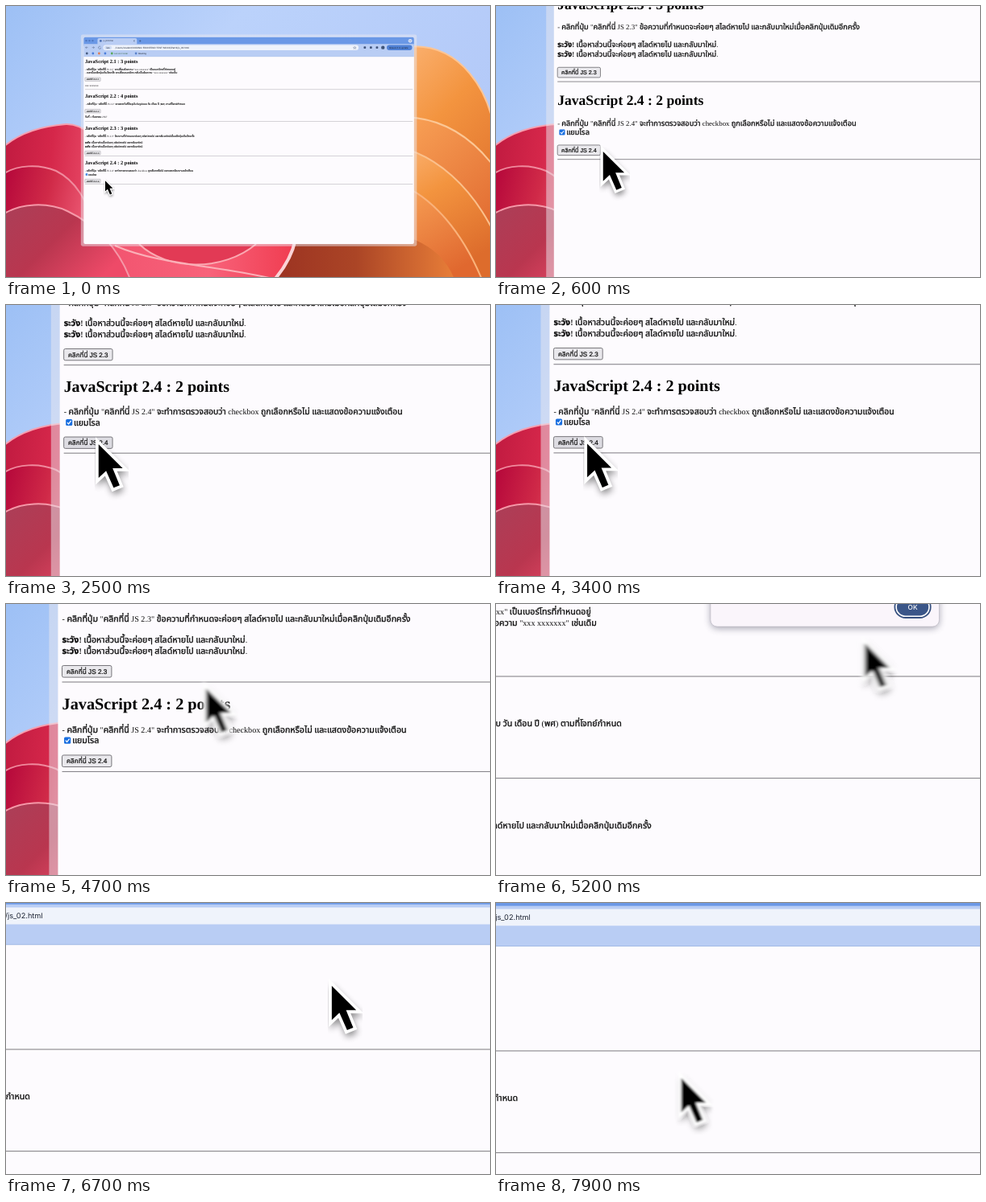
Recreate the animation shown at these times as an HTML page. Size 600 by 337 pixels, loop 8000 ms.

```html
<!DOCTYPE html>
<html lang="th">
<head>
<meta charset="utf-8">
<title>JavaScript exercises</title>
<style>
  html, body { margin: 0; width: 100%; height: 100%; overflow: hidden; background: #b3ccf8; }
  svg { display: block; width: 100vw; height: 100vh; text-rendering: geometricPrecision; }
  text { white-space: pre; }
  .serif { font: 500 16px "Liberation Serif", "Noto Sans Thai", "Noto Serif Thai", "Noto Sans", serif; fill: #0c0c0c; }
  .head { font: 700 32px "Liberation Serif", serif; fill: #000; }
  .btn { font: 500 13px "Liberation Sans", "Noto Sans Thai", "Noto Sans", sans-serif; text-anchor: middle; fill: #0c0c0c; stroke: #0c0c0c; stroke-width: .35px; }
  .ui { font: 400 14.5px Inter, "Noto Sans Thai", sans-serif; fill: #1d2433; }
  .thai { font-size: 1.055em; stroke: #0c0c0c; stroke-width: .5px; }
  .end { text-anchor: end; }
  .mid { text-anchor: middle; }
</style>
</head>
<body>
<svg viewBox="0 0 600 337" preserveAspectRatio="none">
  <defs>
    <linearGradient id="sky" x1="0" y1="0" x2="1" y2=".5">
      <stop offset="0" stop-color="#9dc0f5"/><stop offset=".4" stop-color="#bbd2fb"/><stop offset="1" stop-color="#b3c9f8"/>
    </linearGradient>
    <linearGradient id="rose" x1="0" y1="0" x2="1" y2=".15">
      <stop offset="0" stop-color="#c01a40"/><stop offset=".4" stop-color="#d5274a"/><stop offset="1" stop-color="#f4627a"/>
    </linearGradient>
    <linearGradient id="ruby" x1="0" y1="0" x2="1" y2=".3">
      <stop offset="0" stop-color="#b4063a"/><stop offset=".5" stop-color="#d02a48"/><stop offset="1" stop-color="#f0607a"/>
    </linearGradient>
    <linearGradient id="wine" x1="0" y1="0" x2="1" y2=".6">
      <stop offset="0" stop-color="#ab3f58"/><stop offset=".5" stop-color="#b9364f"/><stop offset="1" stop-color="#ee4a68"/>
    </linearGradient>
    <linearGradient id="pink" x1="0" y1="0" x2="1" y2="0">
      <stop offset="0" stop-color="#f0506c"/><stop offset=".6" stop-color="#f8627a"/><stop offset="1" stop-color="#f03c50"/>
    </linearGradient>
    <linearGradient id="amber" x1="0" y1="0" x2=".4" y2="1">
      <stop offset="0" stop-color="#fbb272"/><stop offset=".4" stop-color="#f3943f"/><stop offset="1" stop-color="#dd6c2c"/>
    </linearGradient>
    <linearGradient id="coral" x1="0" y1="0" x2=".5" y2="1">
      <stop offset="0" stop-color="#f9a357"/><stop offset="1" stop-color="#e0682f"/>
    </linearGradient>
    <linearGradient id="rust" x1="0" y1="0" x2="1" y2="0">
      <stop offset="0" stop-color="#9c3322"/><stop offset=".45" stop-color="#ab4526"/><stop offset="1" stop-color="#e87e38"/>
    </linearGradient>
    <filter id="soft" x="-20%" y="-20%" width="140%" height="140%"><feGaussianBlur stdDeviation="7"/></filter>
    <filter id="motion" x="-40%" y="-40%" width="180%" height="180%"><feGaussianBlur id="smear" stdDeviation="0"/></filter>
  </defs>

  <g stroke-width="2">
    <rect width="600" height="337" fill="url(#sky)"/>
    <path d="M495 51C530 47 555 60 575 84C589 101 597 118 602 138V340H490Z" fill="url(#amber)" stroke="#fcc595"/>
    <path d="M490 138C535 138 572 158 602 196V340H490Z" fill="url(#coral)" stroke="#fcc795"/>
    <path d="M490 176C535 188 575 224 602 276V340H490Z" fill="url(#amber)" stroke="#fbc08c"/>
    <path d="M490 222C530 240 565 280 590 340H490Z" fill="url(#coral)" stroke="#fab27a"/>
    <path d="M334 340C345 326 352 312 357 290H505C530 300 548 318 556 340Z" fill="url(#rust)"/>
    <path d="M-2 174C20 156 48 149 74 147C90 146 120 160 150 210V340H-2Z" fill="url(#rose)" stroke="#f5a0b0"/>
    <path d="M-2 208C14 198 40 196 62 205C86 217 100 240 112 280V340H-2Z" fill="url(#ruby)" stroke="#f08a9d"/>
    <path d="M90 282H359C355 308 345 326 333 340H90Z" fill="url(#pink)"/>
    <path d="M359 290C355 308 345 326 333 340" fill="none" stroke="#fbd3d6" stroke-width="4"/>
    <path d="M165 296C200 330 270 330 310 296" fill="#e23a55" stroke="#fba9b2"/>
    <path d="M135 298C190 322 260 322 335 340" fill="none" stroke="#fbb0b8"/>
    <path d="M-2 258C18 246 50 243 76 255C112 272 140 302 154 340H-2Z" fill="url(#wine)" stroke="#f598a8"/>
  </g>

  <g id="world">
    <rect x="-17.5" y="-138" width="2095" height="1324" rx="12" fill="#eceaf0" fill-opacity=".5"/>
    <g id="page"></g>
    <g id="dialog"></g>
    <g id="cursor">
      <path d="M7 13V80L22 66L37 100L49 95L35 61H55Z" transform="translate(2 8)" stroke="#000" stroke-width="9" opacity=".45" filter="url(#soft)"/>
      <path d="M7 13V80L22 66L37 100L49 95L35 61H55Z" stroke="#fff" stroke-width="12" paint-order="stroke"/>
    </g>
  </g>
</svg>
<script>
const LOOP = 8000, WIDTH = 2060;
const $ = id => document.getElementById(id);

function add(parent, tag, attrs, content) {
  const el = document.createElementNS("http://www.w3.org/2000/svg", tag);
  for (const key in attrs) el.setAttribute(key, attrs[key]);
  if (content) el.innerHTML = content;
  parent.appendChild(el);
  return el;
}
const page = $("page"), dialog = $("dialog");
const box = (g, x, y, width, height, fill, more) => add(g, "rect", { x, y, width, height, fill, ...more });
const dot = (x, y, r, fill) => add(page, "circle", { cx: x, cy: y, r, fill });
const label = (g, x, y, cls, content, style = "") => add(g, "text", { x, y, class: cls, style }, content);
const line = (d, stroke, width) => add(page, "path", { d, stroke, "stroke-width": width, fill: "none" });

function browserBar() {
  box(page, 0, -122, WIDTH, 1294, "#fdfbfe", { rx: 10 });
  box(page, 0, -122, WIDTH, 60, "#6a98e6", { rx: 10 });
  box(page, 0, -79, WIDTH, 79, "#b9cdf4");
  line(`M0 0H${WIDTH}`, "#9db6e4", 1.5);
  for (const x of [16, 36, 56]) dot(x, -100, 6, "#4f77bf");
  box(page, 86, -116, 246, 44, "#b9cdf4", { rx: 10 });
  dot(106, -98, 7, "#4a6fb5");
  label(page, 122, -93, "ui", "js_02.html", "font-size:13px");
  line("M310 -103l9 9m0 -9l-9 9M346 -98h12m-6 -6v12", "#24344f", 2);
  dot(2036, -99, 12, "#d5e1f8");
  line("M2031 -102l5 5l5 -5", "#24344f", 2);
  line("M26 -57H12l6 -6m-6 6l6 6M52 -57h14l-6 -6m6 6l-6 6M106 -62a8 8 0 1 0 2 6", "#33466a", 2);
  box(page, 122, -73, 1592, 33, "#eff3fb", { rx: 16 });
  box(page, 128, -68, 48, 23, "#d3dff5", { rx: 11 });
  label(page, 152, -51.5, "ui mid", "ไฟล์", "font-size:13px");
  label(page, 657, -51, "ui end", "/Users/student/CODING-FRONTEND-TEST-MOCK/Part2/js_02.html");
  line("M1690 -64l3 6h6l-5 4l2 6l-6 -4l-6 4l2 -6l-5 -4h6Z", "#33466a", 1.5);
  for (const x of [1746, 1784, 1822]) box(page, x, -64, 14, 14, "#41557c", { rx: 4 });
  dot(1866, -57, 11, "#3f5478");
  box(page, 1890, -73, 158, 33, "#4f80d4", { rx: 16 });
  label(page, 1964, -52, "ui mid", "Relaunch to update", "font-size:13px");

  ["#46597d", "#4b7edb", "#e27a4f", "#4b7edb"].forEach((c, i) => dot(20 + i * 38, -20, 7, c));
  dot(176, -20, 7, "#59a85b");
  label(page, 190, -15, "ui", "Lesson Folder", "font-size:13px;fill:#3d6b4c");
  dot(326, -20, 7, "#5b83cc");
  label(page, 340, -15, "ui", "Reading", "font-size:13px");
}

// Thai runs are a little larger and heavier than the Latin beside them
const thai = text => text.replace(/[\u0e00-\u0e7f]+/g, '<tspan class="thai">$&</tspan>');
const rule = y => box(page, 8, y - 1, WIDTH - 16, 1.7, "#858388");
const heading = (y, n, points) => label(page, 8, y, "head", `JavaScript 2.${n} : ${points} points`);
const body = (y, text, x = 8) => label(page, x, y, "serif", thai(text));
const bodyEnd = (x, y, text) => label(page, x, y, "serif end", thai(text));
const press = n => `- คลิกที่ปุ่ม "คลิกที่นี่ JS 2.${n}" `;

function button(y, n) {
  const face = box(page, 8, y - 11.5, 97, 23, "#e9e8ec", { rx: 3, stroke: "#6f6e73", "stroke-width": 1.5 });
  label(page, 56.5, y + 4.7, "btn", `คลิกที่นี่ JS 2.${n}`);
  return face;
}

browserBar();

heading(38, 1, 3);
body(84, press(1) + 'จะเปลี่ยนข้อความ "xxx xxxxxxx" เป็นเบอร์โทรที่กำหนดอยู่');
bodyEnd(583, 106, '- และเมื่อคลิกปุ่มเดิมอีกครั้ง จะเปลี่ยนเบอร์โทร กลับเป็นข้อความ "xxx xxxxxxx" เช่นเดิม');
button(142, 1);
body(185, "xxx xxxxxxx");
rule(206);

heading(259, 2, 4);
bodyEnd(632, 304, press(2) + "จะแสดงวันที่ปัจจุบัน ในรูปแบบ วัน เดือน ปี (พศ) ตามที่โจทย์กำหนด");
button(341, 2);
body(381, "วันที่ 4 กันยายน 2567");
rule(406);

heading(459, 3, 3);
body(504, press(3) + "ข้อความที่กำหนดจะค่อยๆ สไลด์หายไป และกลับมาใหม่เมื่อคลิกปุ่มเดิมอีกครั้ง");
for (const y of [545, 567])
  label(page, 8, y, "serif", `<tspan font-weight="700">${thai("ระวัง!")}</tspan>`
    + thai(" เนื้อหาส่วนนี้จะค่อยๆ สไลด์หายไป และกลับมาใหม่."));
button(602, 3);
rule(623);

heading(676, 4, 2);
body(722, press(4) + "จะทำการตรวจสอบว่า checkbox ถูกเลือกหรือไม่ และแสดงข้อความแจ้งเตือน");
box(page, 12, 731, 13, 13, "#1a6fe0", { rx: 2.5 });
line("M14.8 737.6l2.8 3l4.8 -6.4", "#fff", 2);
body(743.5, "แยมโรล", 28);
const lastButton = button(778, 4);
rule(799);

// alert box
box(dialog, 806, -32, 448, 144, "#40405a", { rx: 14, opacity: .45, filter: "url(#soft)" });
box(dialog, 806, -36, 448, 144, "#faf5fb", { rx: 13, stroke: "#b9b6c0", "stroke-width": 1 });
label(dialog, 826, 2, "ui", "This page says", "font-size:16px;font-weight:500;fill:#222");
label(dialog, 826, 31, "ui", "คุณเลือก แยมโรล", "font-size:13px;font-weight:500;fill:#222");
box(dialog, 1167, 48.5, 70, 42, "#fff", { rx: 21, stroke: "#36507f", "stroke-width": 2.8 });
box(dialog, 1171, 52.5, 62, 34, "#3b5688", { rx: 17 });
label(dialog, 1202, 74.5, "ui mid", "OK", "font-size:13px;font-weight:500;fill:#fff");

// rows of [time, value, ...]; smooth and free of overshoot
const zoom = [[0, .1988], [100, .215], [300, .39], [600, .549], [1000, .592], [1400, .6115],
  [2200, .621], [3400, .626], [4700, .633], [8200, .633]];
const pan = [[4400, 0, 0], [4700, -1.5, 25], [5000, -170, 170], [5300, -360, 320],
  [5600, -425, 366], [5800, -433, 372], [7900, -439, 376], [8200, -440, 377]];
const pointer = [[0, 127, 763], [600, 104, 768], [1400, 79, 769], [3400, 67.5, 767.5], [4350, 67.5, 767.5],
  [4700, 282, 623], [5000, 800, 300], [5300, 1180, 85], [5500, 1216, 68], [7100, 1216, 68],
  [7600, 1130, 122], [7900, 946, 246], [8200, 700, 400]];
const alertTime = [4300, 6500];

function slope(rows, i, c) {
  if (i < 1 || i > rows.length - 2) return 0;
  const rate = j => (rows[j + 1][c] - rows[j][c]) / (rows[j + 1][0] - rows[j][0]);
  const a = rate(i - 1), b = rate(i);
  return a * b > 0 ? 2 * a * b / (a + b) : 0;
}

function at(rows, t, c = 1) {
  if (t <= rows[0][0]) return rows[0][c];
  const i = rows.findIndex(r => r[0] > t) - 1;
  if (i < 0) return rows[rows.length - 1][c];
  const span = rows[i + 1][0] - rows[i][0], u = (t - rows[i][0]) / span, v = 1 - u;
  return v * v * (1 + 2 * u) * rows[i][c] + u * u * (3 - 2 * u) * rows[i + 1][c]
    + span * u * v * (v * slope(rows, i, c) - u * slope(rows, i + 1, c));
}

function draw(t) {
  // zooming keeps one point of the page still
  const s = at(zoom, t);
  const x = 110.2 - 69.9 * s + at(pan, t, 1);
  const y = 239.4 - 887.5 * s + at(pan, t, 2);
  $("world").setAttribute("transform", `matrix(${s} 0 0 ${s} ${x} ${y})`);

  $("cursor").setAttribute("transform", `translate(${at(pointer, t, 1)} ${at(pointer, t, 2)})`);
  const [bx, by] = [1, 2].map(c =>
    Math.min(4, Math.abs(at(pointer, t + 10, c) - at(pointer, t - 10, c)) / 20 * 4));
  if (bx + by > .8) {
    $("smear").setAttribute("stdDeviation", `${bx} ${by}`);
    $("cursor").setAttribute("filter", "url(#motion)");
  } else $("cursor").removeAttribute("filter");

  const open = t >= alertTime[0] && t < alertTime[1];
  dialog.setAttribute("visibility", open ? "visible" : "hidden");
  lastButton.setAttribute("fill", t > 900 && t < 4400 ? "#dddce2" : "#e9e8ec");
}

const start = performance.now();
function tick() {
  draw((performance.now() - start) % LOOP);
  requestAnimationFrame(tick);
}
draw(0);
requestAnimationFrame(tick);
</script>
</body>
</html>
```
